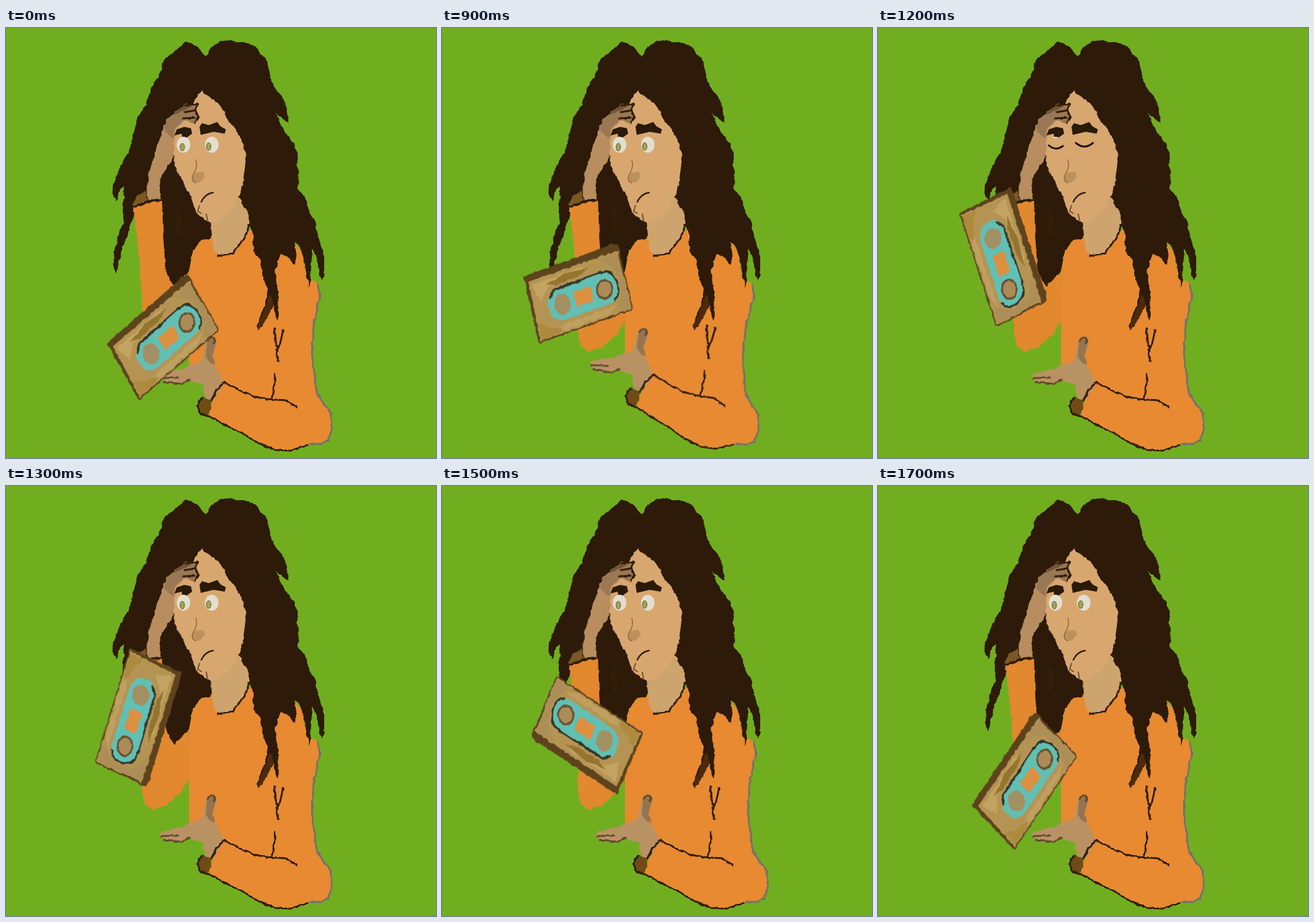
Write an HTML page without scripts that moves like this. It is 700x700 px and loops after 1800 ms.

```html
<!DOCTYPE html>
<html lang="en">
<head>
<meta charset="utf-8">
<title>Tape toss</title>
<style>
  html, body { margin: 0; height: 100%; overflow: hidden; background: #70ae20; }
  svg { display: block; width: 100vw; height: 100vh; }
  .line { fill: none; stroke: #321d0a; stroke-width: 3; stroke-linecap: round; stroke-linejoin: round; }
  .tape, .arm, .lids { animation: 1.8s step-end infinite; }
  .tape { animation-name: toss; }
  .arm { animation-name: swing; }
  .lids { animation-name: blink; }

  /* The drawing is stretched vertically by 1.25, so turns happen inside that scale. */
  @keyframes toss {
    0% { transform: translate(256px, 503px) scale(1, 1.25) rotate(-35deg); }
    44.44%, 94.44% { transform: translate(239px, 480px) scale(1, 1.25) rotate(-50deg); }
    50% { transform: translate(222px, 432px) scale(1, 1.25) rotate(-16deg); }
    55.55% { transform: translate(205px, 390px) scale(1, 1.25) rotate(16.5deg); }
    61.11% { transform: translate(204px, 379px) scale(1, 1.25) rotate(42deg); }
    66.66% { transform: translate(204px, 373px) scale(1, 1.25) rotate(68deg); }
    72.22% { transform: translate(215px, 377px) scale(1, 1.25) rotate(111deg); }
    77.77% { transform: translate(227px, 396px) scale(1, 1.25) rotate(154deg); }
    83.33% { transform: translate(236px, 405px) scale(1, 1.25) rotate(208deg); }
    88.88% { transform: translate(244px, 417px) scale(1, 1.25) rotate(263deg); }
  }
  @keyframes swing {
    0%, 55.55% { transform: none; }
    44.44% { transform: translate(490px, 380px) scale(1, 1.25) rotate(8deg) scale(1, .8) translate(-490px, -380px); }
    50% { transform: translate(490px, 380px) scale(1, 1.25) rotate(4deg) scale(1, .8) translate(-490px, -380px); }
  }
  @keyframes blink {
    0%, 72.22% { visibility: hidden; }
    66.66% { visibility: visible; }
  }
</style>
</head>
<body>
<svg viewBox="0 0 700 700" preserveAspectRatio="none">
  <defs>
    <filter id="rough" x="-5%" y="-5%" width="110%" height="110%" color-interpolation-filters="sRGB">
      <feTurbulence type="fractalNoise" baseFrequency=".11" numOctaves="2" seed="4"/>
      <feDisplacementMap in="SourceGraphic" scale="5" xChannelSelector="R" yChannelSelector="G"/>
    </filter>
  </defs>
  <rect width="700" height="700" fill="#70ae20"/>

  <path id="torso" fill="#e78a32" d="M335 340 318 345 304 363 298 395V548L335 585 440 618 470 575 478 430 470 358 412 325 360 340Z"/>

  <g class="arm"><g filter="url(#rough)">
    <path fill="#e78a32" d="M468 348 482 365 490 405 508 415 511 435 501 480 498 530 505 590 512 605 528 625 531 650 525 672 510 677 490 678 465 688 440 687 415 678 390 663 370 653 328 631 340 600 355 578 380 590 405 600 433 602 438 560 440 490V385Z"/>
    <path class="line" stroke-width="4" style="stroke:#78706a" d="M507 416 511 435 501 480 498 530 505 590 512 605 528 625 531 650 525 672 510 677 496 677"/>
    <path class="line" d="M328 631 370 653 390 663 415 678 440 687 465 688 492 678M355 577 380 590 405 600 425 604 455 606 473 617M437 490 438 510 442 525M438 562 437 580 433 602M451 491 446 515 440 525 444 543"/>
    <path fill="#b99264" d="M250 570 253 563 290 554 305 548 320 540 326 507 335 501 342 507 341 520 336 535 340 550 353 572 352 585 336 607 325 602 320 580 300 573 285 580 265 580Z"/>
    <path fill="#967450" d="M327 512 325 535 332 545 340 548 336 535 342 508 334 502Z"/>
    <path class="line" style="stroke:#624a2b" d="M328 510Q335 498 341 507L338 513M252 570 280 569M256 577 285 579 300 573"/>
    <path fill="#704b15" d="M320 601 333 606 334 617 328 629 317 628 311 618Z"/>
    <path class="line" d="M319 602 311 615 315 627 330 631M334 607 342 590 354 578"/>
  </g></g>

  <g filter="url(#rough)">
    <path id="hair" fill="#2d1a08" d="M325 47 335 30 350 22 365 19 375 24 395 24 410 35 425 55 432 85 440 100 452 115 457 135 460 154 450 147 440 138 446 155 455 172 468 188 475 205 474 225 477 245 474 262 488 275 492 295 503 315 510 345 518 370V400L514 412 510 400 506 375 498 358 497 385 495 422 490 408 486 380 478 355 470 350 473 370 470 386 462 375 447 368 441 385 438 400 443 430 444 470 440 475 436 450 428 460 420 480 411 491 409 486 415 465 422 450 426 425 418 405 413 375 403 365 402 335 396 320 340 330 332 343 318 345 304 363 298 395 285 412 270 425 255 420 235 285 209 300 200 332 190 355 184 380 180 400 175 390 176 365 185 330 192 318 190 300 192 258 186 262 180 282 174 275 175 255 185 228 195 210 203 195 208 170 215 145 228 125 235 100 250 75 258 50 275 38 292 22 302 25 315 35Z"/>
    <path fill="#4c2b0c" d="M430 433 436 452 420 480 411 491 410 484 420 460Z"/>
    <path fill="none" stroke="#341708" stroke-width="5" d="M418 160Q440 200 432 262"/>
    <path fill="#341c0a" d="M275 285 286 305 284 342 276 330Z"/>

    <path id="sleeve" fill="#e2882f" d="M207 292 254 280 256 340 260 397 274 421 300 395 299 476 281 503 260 520 238 527 226 518 221 490 222 450 217 380 212 330Z"/>
    <path id="neck" fill="#cea46e" d="M333 312 380 275 388 292 396 302 396 320 386 345 366 367 345 370 337 360Z"/>
    <path class="line" d="M345 371 368 367 388 343 396 320"/>
    <path id="face" fill="#d8a76f" d="M318 102 328 110 345 122 355 135 360 150 375 165 385 185 391 210 388 235 384 260 378 278 362 302 340 317 325 314 309 299 300 272 285 245 275 225 272 195 276 165 300 138 308 115Z"/>

    <path id="wrist" fill="#b88e60" d="M270 143 290 150 276 165 272 213 262 226 250 248 253 281 233 282 228 268 233 235 248 185 257 160Z"/>
    <path fill="#997853" d="M257 166 262 148 278 134 292 126 312 124 310 134 313 146 304 155 288 150 276 163 272 180Z"/>
    <path fill="#715536" d="M272 140 293 122 302 128 285 137Z"/>
    <path class="line" stroke-width="2" d="M292 126 312 124 308 133 313 144 307 154M291 137 308 134M289 147 307 146"/>
    <path fill="#7b5823" d="M207 290 211 274 226 266 232 282Z"/>
    <path class="line" d="M209 291 230 282 253 280"/>
  </g>

  <g id="features">
    <path fill="#2a1a08" d="M274 175 278 165 290 161 301 163 303 172 293 179 287 179 286 172Z"/>
    <path fill="#2a1a08" d="M315 161 319 155 330 158 344 153 349 160 358 165 356 172 338 169 317 174Z"/>
    <g fill="#e2dfd0">
      <ellipse cx="289" cy="190" rx="11" ry="13"/>
      <ellipse cx="335" cy="190" rx="11" ry="13"/>
    </g>
    <g fill="#a5a35a" stroke="#777332" stroke-width="1.5">
      <ellipse cx="287" cy="194" rx="3.5" ry="6"/>
      <ellipse cx="330" cy="193" rx="3.5" ry="6"/>
    </g>
    <path fill="#bb915f" d="M308 236 320 234 324 242 315 252 304 250 303 243Z"/>
    <path class="line" style="stroke:#8c693e;stroke-width:1.5" d="M309 215Q313 227 304 240Q301 250 309 252"/>
    <path class="line" style="stroke-width:2.5" d="M318 283Q324 270 337 268"/>
    <path class="line" style="stroke:#70502a;stroke-width:2" d="M315 289 312 298 318 302M326 303 328 313"/>
    <g class="lids">
      <path fill="#d8a76f" d="M276 179H302V205H277ZM321 175.5H350V205H321Z"/>
      <path class="line" style="stroke:#1d120a" d="M278 191Q289 201 301 192M322 187Q336 199 350 187"/>
    </g>
  </g>

  <g class="tape"><g filter="url(#rough)">
    <rect x="-80" y="-46" width="160" height="91" rx="4" fill="#5d431d"/>
    <path fill="#b59453" d="M-74-37 77-36 78 43-76 43Z"/>
    <path fill="#c3a362" d="M-70-31 20-32-8-23-45-21-62-8Z"/>
    <path fill="#94752f" d="M-48-26-10-31 25-27 5-21-30-20Z"/>
    <path fill="#ae8e57" d="M40-34 76-34 77 40 55 42 70 10 64-15Z"/>
    <path fill="#c0a060" d="M-45 33 55 32 42 40-35 41Z"/>
    <path fill="#ad8a3e" d="M-73 20-60 28-38 36-45 42-74 42Z"/>
    <rect x="-52" y="-16" width="118" height="43" rx="21.5" fill="#62bfb4"/>
    <path class="line" style="stroke:#30362a" d="M-46-7Q-40-16-28-16H43C68-16 71 18 55 25"/>
    <circle cx="-29" cy="6.5" r="13.5" fill="#a28f62"/>
    <circle cx="43" cy="6.5" r="12" fill="#ab8b58" stroke="#66502d" stroke-width="3"/>
    <rect x="-8" y="-4" width="29" height="20" fill="#dc9040"/>
  </g></g>
</svg>
</body>
</html>
```
